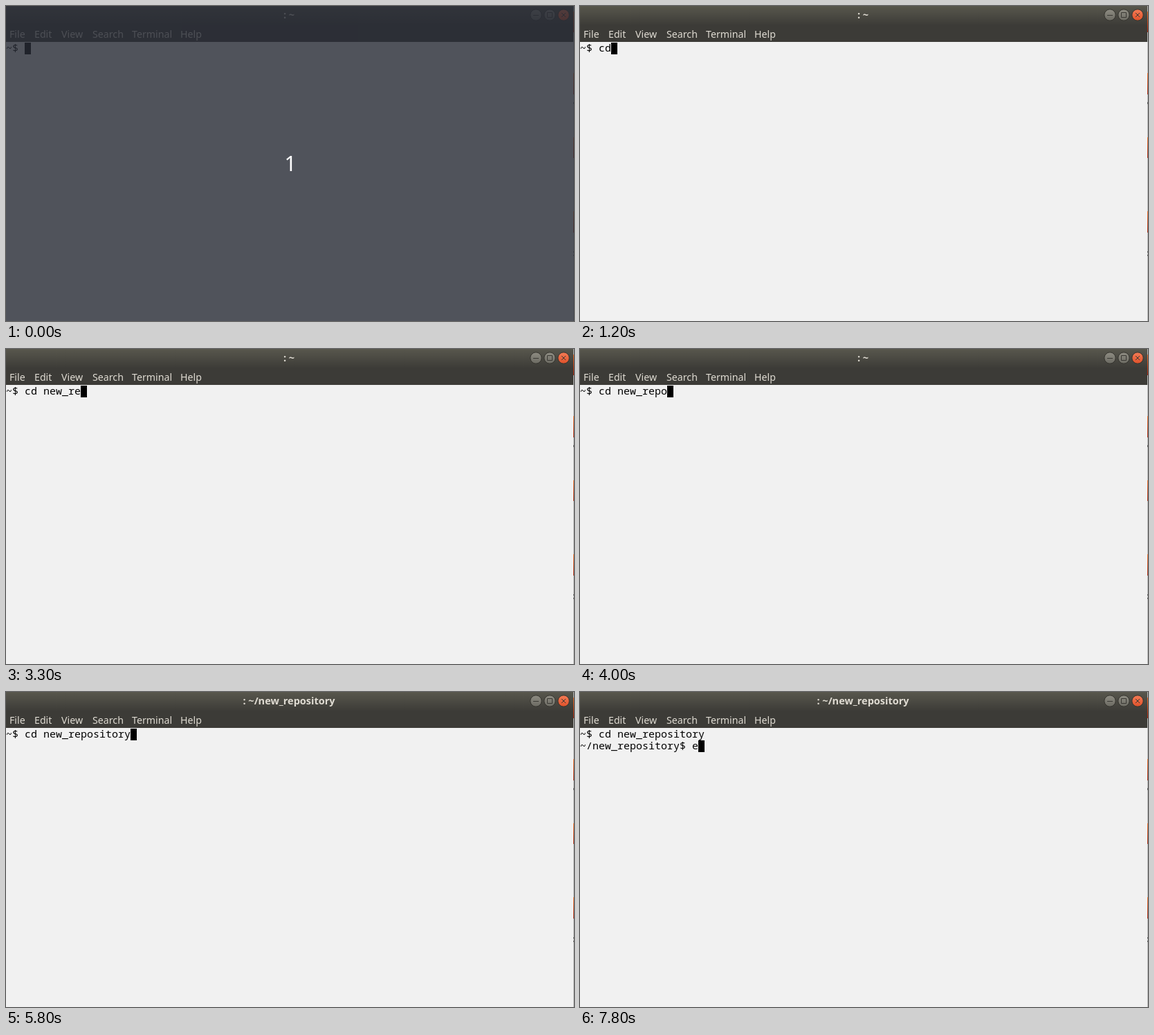
These frames come from a looping animation (821x456 px, 8000 ms). An HTML page:

```html
<!DOCTYPE html>
<html lang="en">
<head>
<meta charset="utf-8">
<title>Terminal</title>
<style>
  html, body { margin: 0; width: 100%; height: 100%; overflow: hidden; background: #f1f1f1; }
  svg { display: block; width: 821px; height: 456px; }
  text { white-space: pre; }
  .ui { font: 14.2px "Noto Sans", "Open Sans", sans-serif; fill: #dfdbd2; }
  .title { font-size: 14.5px; font-weight: 700; text-anchor: middle; }
  .term { font: 15px "Noto Sans Mono", "DejaVu Sans Mono", monospace; fill: #000; }
  .count { font: 500 30px "Noto Sans", sans-serif; fill: #fff; }
  .btn circle { fill: url(#grey); stroke: #33322d; }
  .btn path { fill: none; stroke: #3a3934; }
  .btn .close { fill: url(#orange); }
  #veil { animation: veil 8s step-end infinite; }
  @keyframes veil { 0% { opacity: 1 } 3.75%, 100% { opacity: 0 } }
</style>
</head>
<body>
<svg viewBox="0 0 821 456">
  <defs>
    <linearGradient id="bar" x2="0" y2="1">
      <stop stop-color="#58574d"/><stop offset="1" stop-color="#3c3b37"/>
    </linearGradient>
    <linearGradient id="grey" x2="0" y2="1">
      <stop stop-color="#8e8c82"/><stop offset="1" stop-color="#6b6a62"/>
    </linearGradient>
    <linearGradient id="orange" x2="0" y2="1">
      <stop stop-color="#f47c56"/><stop offset="1" stop-color="#e0512a"/>
    </linearGradient>
    <linearGradient id="strip" x2="0" y2="1">
      <stop stop-color="#e8702c"/><stop offset="1" stop-color="#a3240f"/>
    </linearGradient>
  </defs>

  <rect width="821" height="456" fill="#f1f1f1"/>
  <rect width="820" height="28" fill="url(#bar)"/>
  <rect y="28" width="820" height="24" fill="#3c3b37"/>

  <g id="edge">
    <rect x="820" width="1" height="456" fill="#b4b4b4"/>
    <g fill="url(#strip)">
      <rect x="820" y="8" width="1" height="30"/>
      <rect x="820" y="97" width="1" height="31"/>
      <rect x="820" y="190" width="1" height="30"/>
      <rect x="820" y="297" width="1" height="31"/>
    </g>
    <path d="M820.5 139v3M820.5 355v2M820.5 360v2" stroke="#555"/>
  </g>

  <g class="ui">
    <text id="title" class="title" x="409" y="18"></text>
    <text x="5" y="46">File</text>
    <text x="41" y="46">Edit</text>
    <text x="80" y="46">View</text>
    <text x="125" y="46">Search</text>
    <text x="182" y="46">Terminal</text>
    <text x="252" y="46">Help</text>
  </g>

  <g class="btn">
    <circle cx="766" cy="13" r="8.2"/><path d="M762 13.5h8"/>
    <circle cx="786" cy="13" r="8.2"/><path d="M782.5 9.5h7v7h-7z"/>
    <circle class="close" cx="806" cy="13" r="8.2"/><path d="M803 10l6 6M809 10l-6 6"/>
  </g>

  <g class="term">
    <text id="line1" x="0" y="66"></text>
    <text id="line2" x="0" y="83"></text>
    <rect id="cursor" width="9" height="17"/>
  </g>

  <g id="veil">
    <rect width="821" height="456" fill="#282c36" fill-opacity=".8"/>
    <text class="count" x="402.5" y="239">1</text>
  </g>
</svg>
<script>
  const LOOP = 8000, CELL = 9, ROW = 17, TOP = 53;
  const COMMAND = "cd new_repository";
  // One time per typed character
  const KEYS = [1000, 1200, 1500, 1600, 2000, 2400, 2500, 2900, 3300,
                3500, 4000, 4500, 4900, 5000, 5200, 5300, 5300];
  const ENTER = 6000, RETITLE = 5800, NEXT_KEY = 7800;
  const HIDDEN = [[300, 800], [6400, 6900]];

  const [title, line1, line2, cursor] =
    ["title", "line1", "line2", "cursor"].map(id => document.getElementById(id));

  function put(node, text) {
    if (node.textContent !== text) node.textContent = text;
  }

  function draw(t) {
    const typed = KEYS.filter(k => k <= t).length;
    const first = "~$ " + COMMAND.slice(0, typed);
    const entered = t >= ENTER;
    const second = entered ? "~/new_repository$ " + (t >= NEXT_KEY ? "e" : "") : "";

    put(title, t >= RETITLE ? ": ~/new_repository" : ": ~");
    put(line1, first);
    put(line2, second);

    cursor.setAttribute("x", (entered ? second : first).length * CELL);
    cursor.setAttribute("y", TOP + (entered ? ROW : 0));
    const off = HIDDEN.some(([from, to]) => t >= from && t < to);
    cursor.setAttribute("visibility", off ? "hidden" : "visible");
  }

  const start = performance.now();
  function tick() {
    draw((performance.now() - start) % LOOP);
    requestAnimationFrame(tick);
  }
  tick();
</script>
</body>
</html>
```
